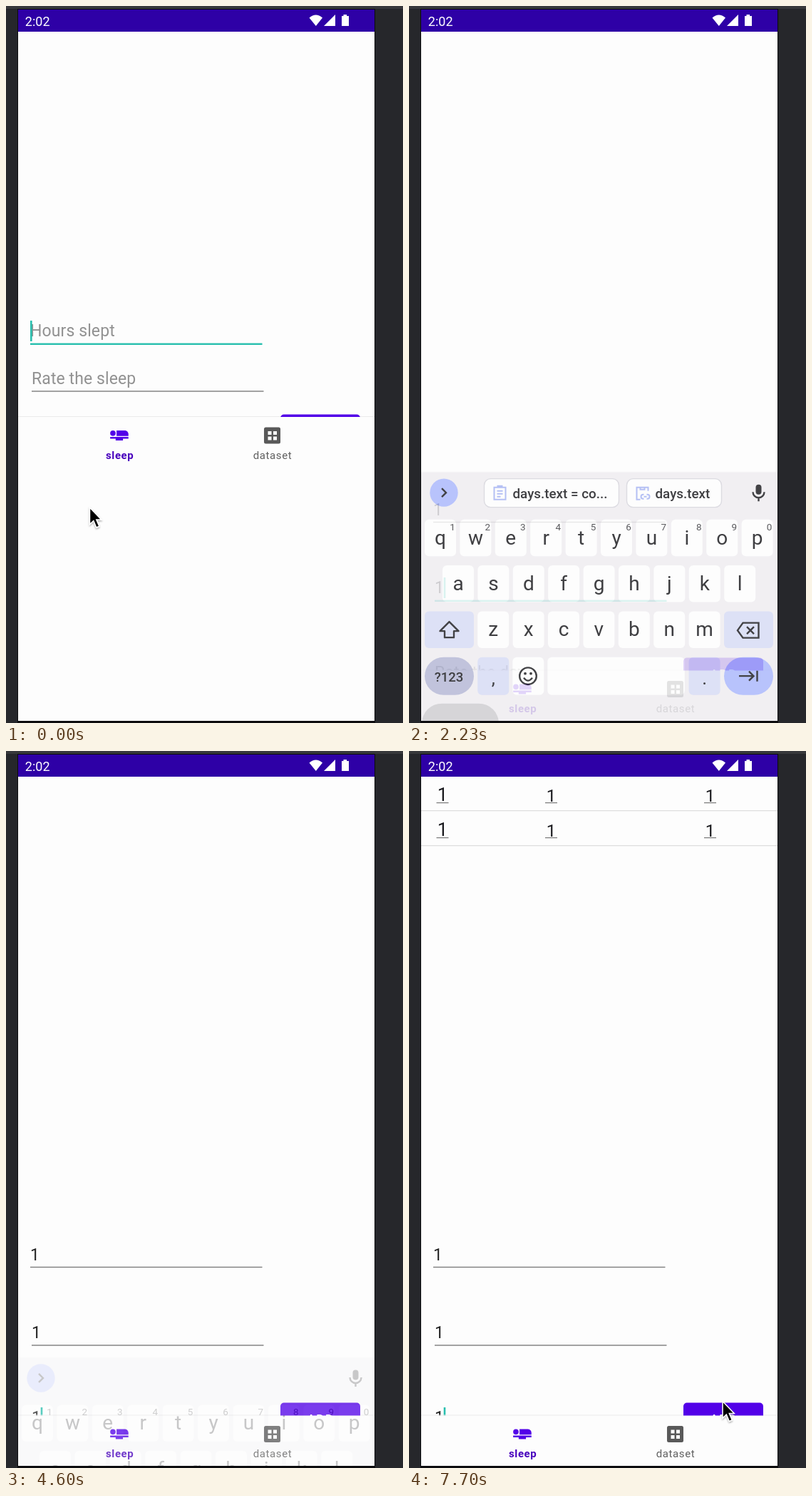
Animation of 557x1005 px, one loop 8000 ms. Source, as an HTML page:

```html
<!DOCTYPE html>
<html lang="en">
<head>
<meta charset="utf-8">
<title>Sleep log</title>
<style>
  html, body { margin: 0; width: 100%; height: 100%; overflow: hidden; background: #26272b; }
  svg { display: block; width: 557px; height: 1005px; font-family: Roboto, "Noto Sans", sans-serif; }
  text { white-space: pre; }
  .mid { text-anchor: middle; }
  .line { fill: none; stroke: #1f1f23; stroke-width: 2.4; }
  .field { font-size: 23px; letter-spacing: .1px; }
</style>
</head>
<body>
<svg id="stage" viewBox="0 0 557 1005">
  <defs>
    <clipPath id="screen"><rect x="17" y="5" width="500" height="997"/></clipPath>
    <filter id="soft" x="-50%" y="-50%" width="200%" height="200%">
      <feDropShadow dx="0" dy="1.5" stdDeviation="1.2" flood-opacity=".35"/>
    </filter>
  </defs>
  <rect width="557" height="1005" fill="#26272b"/>
  <rect width="557" height="4" fill="#37383b"/>
  <rect x="16" y="4" width="502" height="1001" fill="#0c0c0e"/>
  <g clip-path="url(#screen)">
    <rect x="17" y="5" width="500" height="998" fill="#fdfdfd"/>
    <rect x="17" y="5" width="500" height="31" fill="#2e00a6"/>
    <text x="26.800" y="27.500" font-size="18" fill="#fff">2:02</text>
    <g fill="#fff">
      <path d="M425.500 16.500Q434.800 8.500 444 16.500L434.800 28Z"/>
      <path d="M462 12V28H446Z"/>
      <path d="M473.500 12h4.500v2h3v14h-10v-14h2.500Z"/>
    </g>
    <g id="rows"></g>
    <g id="form"></g>
    <g id="button">
      <rect x="385" width="112" height="44" rx="5" fill="#5200e8"/>
      <text class="mid" x="441.500" y="28" font-size="17" font-weight="500" letter-spacing="1.500" fill="#fff">ADD</text>
    </g>
    <g id="nav">
      <rect x="17" y=".5" width="500" height="72" fill="#fdfdfd"/>
      <path d="M17 0H385M497 0H517" stroke="#ebebeb" stroke-width="1.200"/>
      <path transform="translate(143.600 10.500) scale(1.28)" fill="#5200e8"
        d="M22 11v2H9V7h9c2.210 0 4 1.790 4 4zM2 14v2h6v2h8v-2h6v-2z M2 10a3 3 0 1 0 6 0a3 3 0 1 0-6 0z"/>
      <text class="mid" x="159.700" y="59" font-size="15" font-weight="700" letter-spacing=".6" fill="#4800bd">sleep</text>
      <rect x="362" y="15" width="23" height="23" rx="2.500" fill="#595959"/>
      <path d="M367.500 20.500h5v5h-5zM375 20.500h5v5h-5zM367.500 28h5v5h-5zM375 28h5v5h-5z" fill="#fdfdfd"/>
      <text class="mid" x="374" y="59" font-size="15" letter-spacing=".6" fill="#606060">dataset</text>
    </g>
    <g id="board"></g>
  </g>
  <g id="mouse" filter="url(#soft)">
    <path d="M0 0V23.500L5.300 18.500L9.300 28L13.300 26.300L9.300 17H16.300Z" fill="#000" stroke="#fff" stroke-width="1.500"/>
  </g>
</svg>
<script>
const LOOP = 8000, BLINK = 350;
const SHOW_MS = 190, HIDE_MS = 238, TRAVEL = 356;
const $ = id => document.getElementById(id);

function add(parent, tag, attrs, text) {
  const el = document.createElementNS("http://www.w3.org/2000/svg", tag);
  for (const k in attrs) el.setAttribute(k, attrs[k]);
  if (text) el.textContent = text;
  parent.appendChild(el);
  return el;
}
const box = (p, x, y, width, height, rx, fill) => add(p, "rect", { x, y, width, height, rx, fill });
const icon = (p, d, more) => add(p, "path", { d, class: "line", ...more });
const label = (p, x, y, size, text, more) =>
  add(p, "text", { x, y, "font-size": size, fill: "#1b1b1f", ...more }, text);
const place = (el, x, y) => el.setAttribute("transform", `translate(${x} ${y})`);
const show = (el, on) => el.setAttribute("display", on ? "inline" : "none");

// Form fields: y is the text baseline with the keyboard up or down.
const fields = [
  { x: 34, up: 463, down: 713.5, hint: "Hours slept", typed: 400 },
  { x: 36, up: 530, down: 823, hint: "Rate the sleep", typed: 1300 },
  { x: 36, up: 597, down: 942, hint: "Rate the day", typed: 3950 }
];
for (const f of fields) {
  f.g = add($("form"), "g", {});
  f.hintEl = add(f.g, "text", { x: f.x, class: "field", fill: "#929292" }, f.hint);
  f.valueEl = add(f.g, "text", { x: f.x, class: "field", fill: "#242424" }, "1");
  f.rule = add(f.g, "rect", { x: f.x, width: 325.5 });
  f.caret = add(f.g, "rect", { y: -22, width: 2.6, height: 29, fill: "#28bfae" });
}

const rows = [5850, 6950].map((time, i) => {
  const g = add($("rows"), "g", { transform: `translate(0 ${i * 49})` });
  [[47, 70, 26], [199.5, 71, 24], [422.5, 71, 24]].forEach(([x, y, size]) => {
    label(g, x, y, size, "1", { class: "mid" });
    box(g, x - 8.5, 72, 17, 1.2, 0, "#777");
  });
  box(g, 17, 83, 500, 1.3, 0, "#dedede");
  return { g, time };
});

// Keyboard
const board = $("board"), BLUE = "#acb9fc", PALE = "#d8dcf5", KEY = "#fdfdfd";
const PITCH = 49.4, ROW = 64.4;
box(board, 17, 646, 500, 1, 0, "#f5f4f6");
box(board, 17, 647, 500, 370, 0, "#efedf1");
add(board, "circle", { cx: 49, cy: 675.5, r: 19.7, fill: BLUE });
icon(board, "M46 669.500l6 6l-6 6");

const chips = add(board, "g", {});
[[105, 189, "days.text = co..."], [305, 133, "days.text"]].forEach(([x, w, text], i) => {
  add(chips, "rect", { x: x + .5, y: 656, width: w, height: 40, rx: 9, fill: KEY, stroke: "#d6d5dc", "stroke-width": 1.4 });
  label(chips, x + 40.5, 683, 18.8, text, { "font-weight": 500 });
  const pen = { style: "stroke:#a8b5f3;stroke-width:2" };
  const l = x + 14.5;
  icon(chips, i ? `M${l + 5} 685h-5v-17h16v5M${l + 5} 668v3h6v-3M${l + 10} 678h-1a3 3 0 0 0 0 6h1M${l + 14} 678h1a3 3 0 0 1 0 6h-1M${l + 10} 681h4`
    : `M${l} 668h16v17h-16zM${l + 5} 668v-2h6v2M${l + 4} 673h8M${l + 4} 677h8M${l + 4} 681h5`, pen);
});

box(board, 486.500, 664, 8, 14, 4, "#1f1f23");
icon(board, "M482.500 674.500a8 8 0 0 0 16 0M490.500 682.500v5");

[["qwertyuiop", 44, 0], ["asdfghjkl", 69, 1], ["zxcvbnm", 118.2, 2]].forEach(([keys, start, r]) => {
  [...keys].forEach((key, i) => {
    const x = start + i * PITCH, y = 713 + r * ROW;
    box(board, x - 22, y, 44, 51.5, 6, KEY);
    label(board, x, y + 35, 28, key, { class: "mid" });
    if (!r) label(board, x + 17, y + 15, 13.5, String((i + 1) % 10), { class: "mid", fill: "#3c3c40" });
  });
});

box(board, 22, 841.800, 69, 51.5, 6, PALE);
icon(board, "M56.500 856.500l13 13h-6.500v9h-13v-9h-6.500z", { "stroke-linejoin": "round" });
box(board, 442, 841.800, 69, 51.5, 6, PALE);
icon(board, "M461 868.500l7.500-10.500h22v21h-22zM474 863.500l10 10M484 863.500l-10 10");
box(board, 22, 906.200, 69, 53, 26.5, "#b6b9d6");
label(board, 56, 940, 18.5, "?123", { class: "mid", "font-weight": 500 });
for (const [x, w, fill, text] of [[96.3, 44, PALE, ","], [145.3, 44, KEY, ""], [194.3, 192.5, KEY, ""], [392.6, 44, PALE, "."]]) {
  box(board, x, 906.200, w, 53, 6, fill);
  if (text) label(board, x + 22, 944, 26, text, { class: "mid" });
}
add(board, "circle", { cx: 167, cy: 932.5, r: 11.8, class: "line" });
icon(board, "M161 935q6 8 12 0");
for (const cx of [163, 171]) add(board, "circle", { cx, cy: 929, r: 1.9, fill: "#1f1f23" });
box(board, 442, 906.200, 69, 53, 26.5, BLUE);
const nextIcon = icon(board, "M463 932.500h20M477 926l6.500 6.500l-6.500 6.500M488.500 925v15");
const doneIcon = icon(board, "M467 933l6 6l13-13");
const ripple = box(board, 18, 971, 108, 64, 28, "#cfced1");
icon(board, "M65.500 999l6 6l6-6", { style: "stroke:#555;stroke-width:2" });
for (const y of [997, 1002]) icon(board, `M452 ${y + .5}h21`, { style: "stroke:#66666a", "stroke-dasharray": "2.4 2.1" });

// Motion
function bezier(x1, y1, x2, y2) {
  const at = (a, b, s) => 3 * a * s * (1 - s) ** 2 + 3 * b * s * s * (1 - s) + s ** 3;
  return x => {
    let lo = 0, hi = 1;
    for (let i = 0; i < 24; i++) {
      const m = (lo + hi) / 2;
      if (at(x1, x2, m) < x) lo = m; else hi = m;
    }
    return at(y1, y2, lo);
  };
}
const slideIn = bezier(.2, 0, 0, 1), slideOut = bezier(.4, 0, 1, 1), glide = bezier(.4, 0, .4, 1);
const clamp = v => Math.max(0, Math.min(1, v));

const keyboardMoves = [[10, true], [2207, false], [3405, true], [4433, false]];
const blinkStarts = [0, 400, 620, 1300, 3405, 3950, 4433, 4830];
const mousePath = [
  [0, 117.5, 703], [100, 117.5, 703], [470, 117, 557.5], [620, 113, 528], [1200, 113, 528],
  [1700, 72, 1012], [2640, 74, 1012], [3050, 91, 914.5], [3650, 91, 914.5], [4250, 72, 1012],
  [5110, 110, 1012], [5530, 441.5, 912.5], [6570, 441.5, 912.5], [6600, 440, 911.5], [8000, 440, 911.5]
];
const last = (list, t, time) => list.filter(v => time(v) <= t).pop();

function moveMouse(t) {
  const i = Math.max(1, mousePath.findIndex(p => p[0] > t));
  const [t0, x0, y0] = mousePath[i - 1], [t1, x1, y1] = mousePath[i];
  const k = glide(clamp((t - t0) / (t1 - t0)));
  place($("mouse"), x0 + (x1 - x0) * k, y0 + (y1 - y0) * k);
}

function moveKeyboard(t) {
  const [start, opening] = last(keyboardMoves, t, m => m[0]) || [10, true];
  const k = clamp((t - start) / (opening ? SHOW_MS : HIDE_MS));
  place(board, 0, TRAVEL * (opening ? 1 - slideIn(k) : slideOut(k)));
  board.setAttribute("opacity", opening ? clamp(k * 2) : clamp(.94 - k));
  show(chips, t < 3950);
  show(nextIcon, t < 3405);
  show(doneIcon, t >= 3405);
  show(ripple, (t > 2120 && t < 2500) || (t > 4340 && t < 4700));
  return opening;
}

function drawForm(t, compact) {
  const focus = t < 620 ? 0 : t < 3405 ? 1 : 2;
  const blinkOn = Math.floor((t - last(blinkStarts, t, v => v)) / BLINK) % 2 === 0;
  fields.forEach((f, i) => {
    const filled = t >= f.typed, active = i === focus;
    place(f.g, 0, compact ? f.up : f.down);
    show(f.hintEl, !filled);
    show(f.valueEl, filled);
    show(f.caret, active && blinkOn);
    f.caret.setAttribute("x", f.x + (filled ? 12.7 : 0));
    f.rule.setAttribute("y", active ? 9.6 : 9.3);
    f.rule.setAttribute("height", active ? 2.4 : 1.4);
    f.rule.setAttribute("fill", active ? "#28bfae" : "#7c7c7c");
  });
  place($("button"), 0, compact ? 572.5 : 913.5);
  place($("nav"), 0, compact ? 575.5 : 931);
}

function draw(t) {
  drawForm(t, moveKeyboard(t));
  for (const r of rows) r.g.setAttribute("opacity", clamp((t - r.time) / 170));
  moveMouse(t);
}

const begin = performance.now();
function tick() {
  draw((performance.now() - begin) % LOOP);
  requestAnimationFrame(tick);
}
tick();
</script>
</body>
</html>
```
